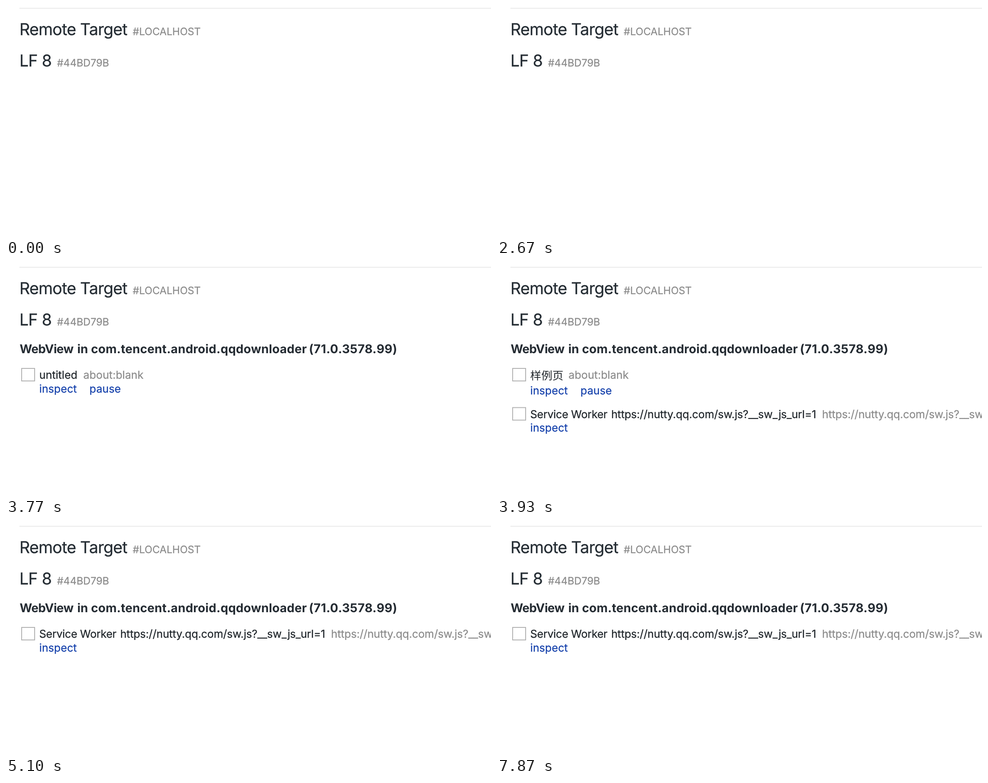
An HTML page that plays this animation: 1084x516 px, repeating every 8.23 s.

```html
<!DOCTYPE html>
<html lang="en">
<head>
<meta charset="utf-8">
<title>Remote targets</title>
<style>
  html, body { margin: 0; width: 100%; height: 100%; overflow: hidden; background: #fff; }
  svg { display: block; }
  text {
    font-family: Inter, "Noto Sans CJK SC", "Noto Sans CJK", sans-serif;
    font-optical-sizing: none;
    text-rendering: geometricPrecision;
    white-space: pre;
    fill: var(--ink);
    stroke: var(--ink);
    stroke-width: 0.3px;
  }
  .head { --ink: #242c33; font-size: 36.5px; letter-spacing: -0.8px; }
  .tag { --ink: #8b8b8b; font-size: 22.7px; }
  .bold { --ink: #252c33; font-size: 27px; font-weight: 700; stroke: none; }
  .body, .muted, .link { font-size: 24.3px; }
  .body, .cjk { --ink: #20262b; }
  .muted { --ink: #8c8c8c; }
  .link { --ink: #1541ab; }
  .cjk { font-size: 24.7px; font-family: "Noto Sans CJK SC", "Noto Sans CJK", sans-serif; stroke: none; }
  .box { fill: #fff; stroke: #b4b4b4; stroke-width: 2; }
</style>
</head>
<body>
<svg id="stage" width="1084" height="516" viewBox="0 0 1084 516"></svg>
<script>
const LOOP = 8230;
const URL_TEXT = "https://nutty.qq.com/sw.js?__sw_js_url=1";
const stage = document.getElementById("stage");

function add(parent, tag, attrs, content = "") {
  const el = document.createElementNS("http://www.w3.org/2000/svg", tag);
  for (const key in attrs) el.setAttribute(key, attrs[key]);
  el.textContent = content;
  parent.append(el);
  return el;
}

function text(parent, style, x, y, content, spacing) {
  const el = add(parent, "text", { class: style, x, y }, content);
  if (spacing) el.style.letterSpacing = spacing + "px";
}

const group = () => add(stage, "g", {});
const box = (parent, y) => add(parent, "rect", { class: "box", x: 35, y, width: 29, height: 28 });

function pageRow(parent, title, style, titleY, urlX, linkY) {
  box(parent, 231);
  text(parent, style, 74.3, titleY, title);
  text(parent, "muted", urlX, 254, "about:blank");
  text(parent, "link", 74.3, linkY, "inspect");
  text(parent, "link", 186.6, linkY, "pause");
}

function workerRow(parent, y) {
  box(parent, y - 23);
  text(parent, "body", 74.3, y, "Service Worker", -0.3);
  text(parent, "body", 255.2, y, URL_TEXT, -0.18);
  text(parent, "muted", 726.6, y, URL_TEXT, -0.18);
  text(parent, "link", 74.3, y + 30.5, "inspect");
}

// Always visible
add(stage, "rect", { x: 30, y: 4, width: 1054, height: 2, fill: "#ebebeb" });
text(stage, "head", 30, 65.3, "Remote Target");
text(stage, "tag", 283.3, 64.8, "#LOCALHOST");
text(stage, "head", 30, 135.3, "LF 8");
text(stage, "tag", 114, 134.8, "#44BD79B");

const webview = group();
text(webview, "bold", 30.5, 197, "WebView", -0.6);
text(webview, "bold", 159.2, 197, "in");
text(webview, "bold", 190, 197, "com.tencent.android.qqdownloader", 0.17);
text(webview, "bold", 677, 197, "(71.0.3578.99)", 0.4);

const blank = group();
pageRow(blank, "untitled", "body", 254, 172.8, 284.5);

const loaded = group();
pageRow(loaded, "样例页", "cjk", 256, 159.8, 288.5);
workerRow(loaded, 341.5);

const closed = group();
workerRow(closed, 254);

// [group, shown from, hidden from] in ms
const spans = [
  [webview, 2700, LOOP],
  [blank, 2700, 3930],
  [loaded, 3930, 5100],
  [closed, 5100, LOOP]
];

function draw(now) {
  const t = now % LOOP;
  for (const [el, from, to] of spans) {
    el.setAttribute("visibility", t >= from && t < to ? "visible" : "hidden");
  }
}

const start = performance.now();
function tick() {
  draw(performance.now() - start);
  requestAnimationFrame(tick);
}
tick();
</script>
</body>
</html>
```
